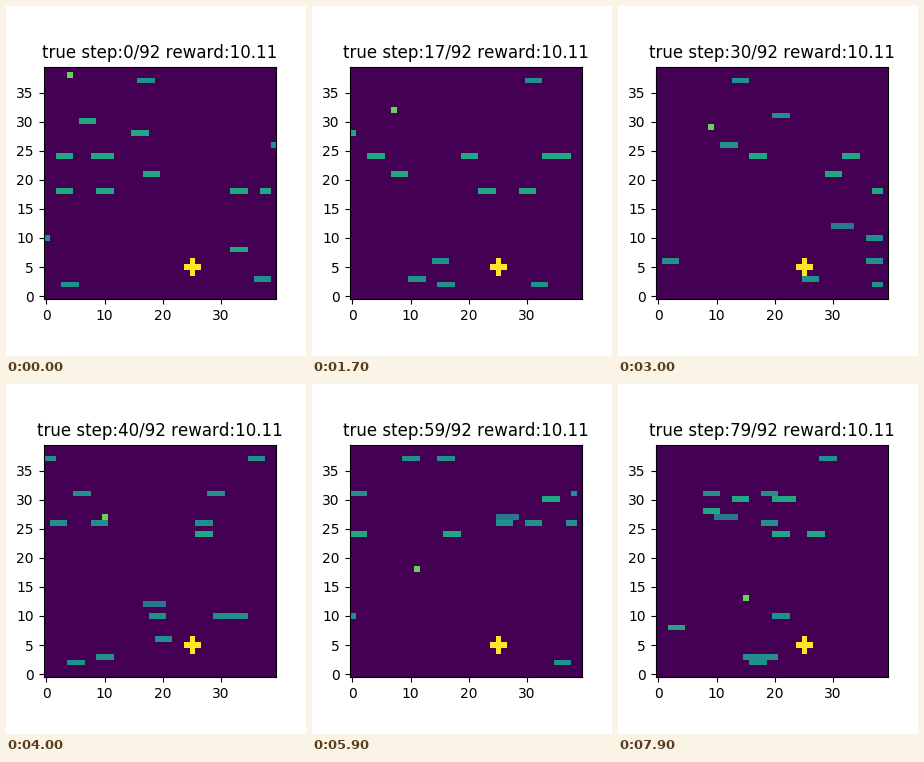
A matplotlib script that plays this animation: 300x350 px, repeating every 8000 ms.

```python
import numpy as np
import matplotlib.pyplot as plt
from matplotlib.animation import FuncAnimation

SIZE, LAST = 40, 39
STEPS, TOTAL, REWARD = 80, 92, 10.11
BLUE, TEAL, GREEN, AGENT, GOAL = 0.4, 0.5, 0.6, 0.78, 1.0

plt.rcParams["text.kerning_factor"] = 6  # whole-pixel glyph advances

lanes = []


def lane(row, tone, speed, *entries):
    """A row of cars at one speed, each entering at the given step."""
    lanes.append((row, tone, speed, entries))


lane(37, TEAL, -1.34, -17.9, 9.6, 36.2, 40.4, 70.3)
lane(31, TEAL, -1.5, 16.7, 32, 57.7, 64.5)
lane(30, GREEN, -1, -34, 52, 59, 60)
lane(28, GREEN, -1, -25)
lane(28, GREEN, -1.75, 60.7)
lane(27, BLUE, -0.77, 39.8)
lane(26, TEAL, 1.5, -28, 20.4, 32.5, 37.1, 40.3, 65)
lane(24, GREEN, 1, -5, 11.4, 56)
lane(24, GREEN, 1.48, -8.4, -7.4)
lane(24, GREEN, 1.8, 48.4, 62.9)
lane(21, GREEN, 1.7, -11.8, 11.1)
lane(18, GREEN, 1.17, -34.2, -29.9, -10.3, -4.3)
lane(12, BLUE, -1.3, 22.3)
lane(10, TEAL, -1.75, -24, 27.5, 33.7, 35.2, 67.3)
lane(8, GREEN, 1, -35, 74)
lane(6, TEAL, 1.75, 7.5, 27.5)
lane(3, TEAL, -1.55, -2.4, 20.2, 63, 64.8)
lane(2, TEAL, 1.65, -3.6, 5.9, 35.8, 67.5)

# Key points of the agent's walk: step, column, row
walk_t, *walk_xy = zip((0, 4, 38), (17, 7, 32), (30, 9, 29), (40, 10, 27),
                       (59, 11, 18), (71, 16, 15), (79, 15, 13))


def cell(value):
    return int(np.floor(value + 0.5))


def draw_car(grid, row, tone, x):
    width = 4 if tone == BLUE else 3
    end = max(min(x + width, LAST), x + 1)
    if x < SIZE and end > 0:
        grid[row, max(x, 0):end] = tone


def world(step):
    grid = np.zeros((SIZE, SIZE))
    for row, tone, speed, entries in lanes:
        start = -3 if speed > 0 else SIZE
        for entry in entries:
            draw_car(grid, row, tone, cell(start + speed * (step - entry)))
    grid[5, 24:27] = grid[4:7, 25] = GOAL
    col, row = (cell(np.interp(step, walk_t, w)) for w in walk_xy)
    grid[row, col] = AGENT
    return grid


fig, ax = plt.subplots(figsize=(3, 3.5), dpi=100)
image = ax.imshow(world(0), origin="lower", cmap="viridis",
                  vmin=0, vmax=1, interpolation="nearest")
ax.set_xticks(range(0, SIZE, 10))
ax.set_yticks(range(0, SIZE, 5))
title = ax.set_title("")


def update(step):
    image.set_data(world(step))
    title.set_text(f"true step:{step}/{TOTAL} reward:{REWARD}")
    return image, title


anim = FuncAnimation(fig, update, frames=STEPS, interval=100,
                     repeat=True, repeat_delay=0, blit=False)
plt.show()
```
